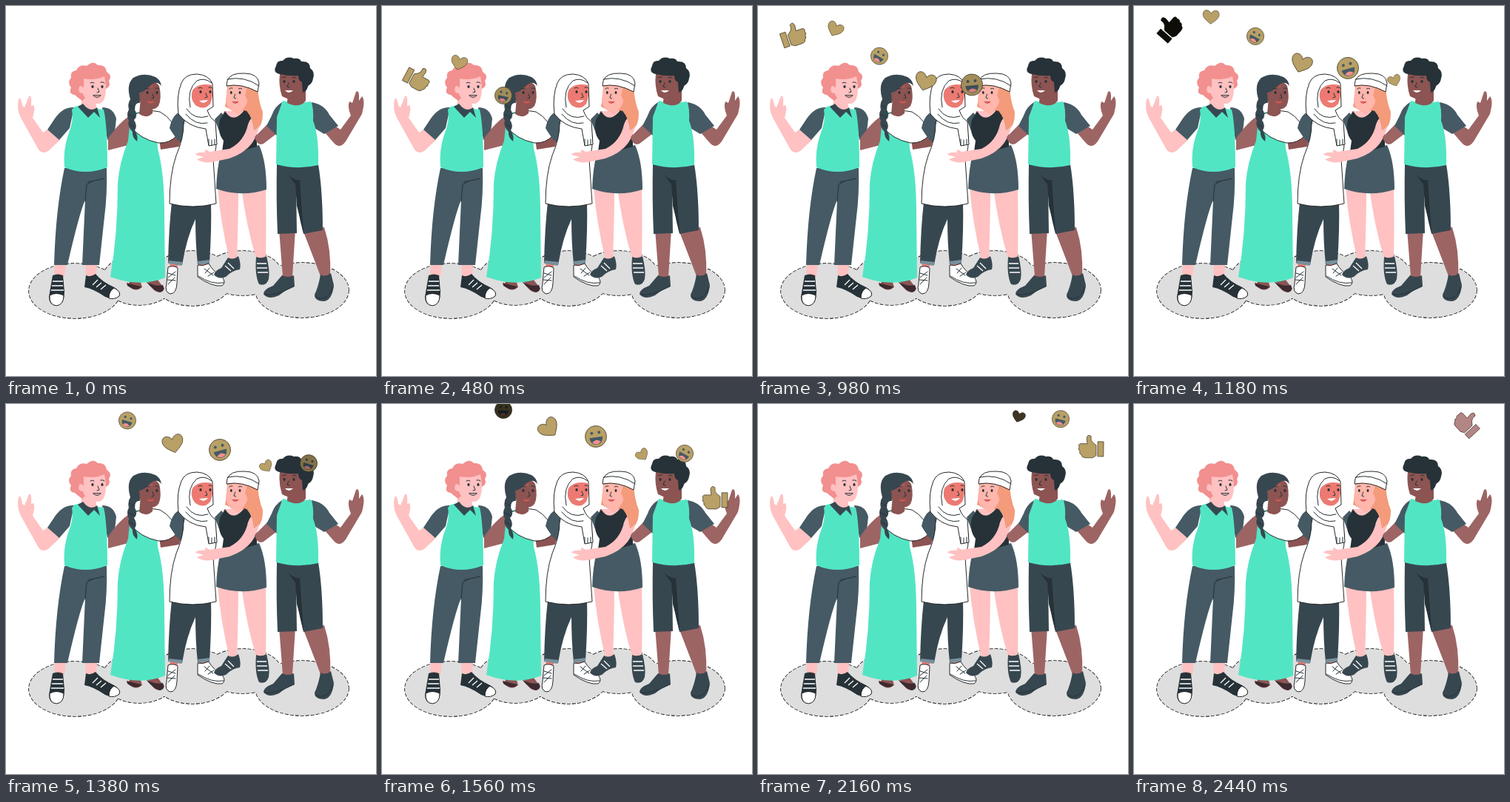
These frames come from a looping animation (500x500 px, 2.46 s). An HTML page:

```html
<!DOCTYPE html>
<html>
<head>
<meta charset="utf-8">
<style>
  html, body { margin: 0; width: 100%; height: 100%; overflow: hidden; background: #fff; }
  svg { display: block; width: 500px; height: 500px; }
  .pink { fill: #ffc1c1 } .brown { fill: #9d6464 } .deep { fill: #8c5452 } .coral { fill: #ec7a72 }
  .mint { fill: #52e5c4 } .slate { fill: #455a64 } .dark { fill: #37474f } .ink { fill: #263238 }
  .white { fill: #fff; stroke: #111; stroke-width: .9 }
  .line { fill: none; stroke: #263238; stroke-width: 1; stroke-linecap: round }
  .lace { fill: none; stroke: #fff; stroke-width: 1.3 }
  .gold { fill: #b8a066; stroke: #3a3020; stroke-width: .7 }
</style>
</head>
<body>
<svg viewBox="0 0 500 500">
  <defs>
    <g id="thumb">
      <path d="M-17-8H-9V12H-17Z"/>
      <path d="M-7-3L-2-7Q1-10 0-15Q5-19 6-12L5-5H14Q18-4 16 0Q18 3 15 5Q16 9 13 10Q12 14 8 14H-2L-7 11Z"/>
    </g>
    <path id="heart" d="M0 12C-8 6-14 2-14-5C-14-13-4-14 0-6C4-14 14-13 14-5C14 2 8 6 0 12Z"/>
    <g id="smile">
      <circle r="14.5"/>
      <g stroke="none">
        <circle class="slate" cx="-5" cy="-5" r="2"/><circle class="slate" cx="5" cy="-5" r="2"/>
        <path class="slate" d="M-9 1H9Q8 11 0 11Q-8 11-9 1Z"/>
        <path fill="#f28f8f" d="M-6 8Q0 2 6 8Q0 13-6 8Z"/>
      </g>
    </g>
    <g id="eyes" class="ink"><ellipse rx="1.6" ry="2"/><ellipse cx="13" rx="1.6" ry="2"/>
      <path class="line" d="M-3-5Q0-7 2-5M11-6Q14-7 16-5M7 2L9 7L6 8"/></g>
  </defs>

  <g fill="none" stroke="#111" stroke-width="1.6" stroke-dasharray="5 2">
    <g id="shadow">
      <ellipse cx="93" cy="385" rx="62" ry="37"/><ellipse cx="180" cy="370" rx="50" ry="34"/>
      <ellipse cx="252" cy="368" rx="55" ry="37"/><ellipse cx="320" cy="361" rx="52" ry="30"/>
      <ellipse cx="400" cy="384" rx="63" ry="37"/>
    </g>
  </g>
  <g fill="#dedede" stroke="none">
    <ellipse cx="93" cy="385" rx="62" ry="37"/><ellipse cx="180" cy="370" rx="50" ry="34"/>
    <ellipse cx="252" cy="368" rx="55" ry="37"/><ellipse cx="320" cy="361" rx="52" ry="30"/>
    <ellipse cx="400" cy="384" rx="63" ry="37"/>
  </g>

  <!-- man with curly red hair -->
  <g>
    <path class="pink" d="M66 347H81L79 366H65ZM107 347H123L122 367H108Z"/>
    <path class="ink" d="M63 364Q70 361 77 364L79 386Q79 404 68 405Q58 404 58 393Z"/>
    <path class="white" d="M59 391Q68 386 78 391Q78 404 68 405Q58 404 59 391Z"/>
    <path class="lace" d="M63 372H77M62 378H77M61 384H78"/>
    <path class="ink" d="M108 364Q114 367 121 362Q130 373 146 380Q156 386 153 392Q145 398 134 393Q118 382 106 380Z"/>
    <path class="white" d="M139 395Q139 385 146 381Q156 386 153 392Q147 397 139 395Z"/>
    <path class="lace" d="M117 377L124 370M122 380L129 374M128 383L135 377"/>
    <path class="slate" d="M79 219H136Q137 255 133 285L126 350H103L107 262Q99 280 83 350H65Q67 275 79 219Z"/>
    <path class="line" d="M107 264L109 241L118 236M111 238L133 233"/>
    <path class="pink" d="M17 126Q20 121 22 135L25 137L31 122Q35 119 34 135L37 134Q40 138 36 151L50 171L58 166L73 181L57 196Q49 201 44 194L20 151Q14 139 17 126Z"/>
    <path class="slate" d="M92 137Q77 136 66 152L56 167L72 181L86 165ZM130 137Q145 137 149 152L147 171L137 181Z"/>
    <path class="mint" d="M93 136L106 133L125 139L132 140Q137 160 137 218Q107 230 79 218Q77 195 84 174Q92 155 89 140Z"/>
    <path class="pink" d="M101 118H121L122 138Q119 147 102 134Z"/>
    <path class="dark" d="M97 136L104 132Q114 145 123 137L127 151L119 143L111 151Z"/>
    <path fill="#f28f8f" d="M103 128Q96 123 93 120Q84 119 88 110Q82 103 88 97Q86 88 95 87Q99 78 109 81Q118 73 124 80Q135 79 136 89Q144 94 139 101Q142 109 135 112L126 106Z"/>
    <path class="pink" d="M105 98Q120 101 133 95Q137 113 133 125Q129 136 115 130Q105 125 104 118Q96 118 99 109Q102 106 105 111Z"/>
    <use href="#eyes" x="117" y="109"/>
    <path class="line" d="M118 121Q123 126 128 121Z" fill="#fff"/>
  </g>

  <!-- woman with braid -->
  <g>
    <path class="deep" d="M168 370H181L184 380Q175 388 165 378ZM190 369L205 370L214 382Q208 391 199 383Z"/>
    <path fill="#3d2b30" d="M163 374Q173 377 183 379Q177 387 164 378ZM189 372Q202 380 212 377Q216 385 208 387Q199 385 189 372Z"/>
    <path class="brown" d="M168 148Q154 156 138 179V195L169 187Z"/>
    <path class="deep" d="M207 180L230 172L237 177L234 190L209 194Z"/>
    <path class="mint" d="M169 143L202 145L205 193Q214 225 214 280L215 367Q181 381 141 366Q151 308 151 240Q153 212 165 182Z"/>
    <path class="white" stroke-width=".5" d="M172 147Q190 139 208 143Q227 153 231 175Q221 186 206 185Q181 180 169 163Z"/>
    <path class="deep" d="M182 124H199L198 145Q190 153 180 146Z"/>
    <path class="deep" d="M180 104Q198 96 207 108Q211 125 206 135Q200 143 188 136Q178 129 178 119Z"/>
    <path class="dark" d="M210 108Q203 99 193 109Q187 116 180 117L181 131Q174 130 174 140Q179 149 173 154Q178 162 174 168Q179 176 177 183Q170 177 171 170Q163 162 166 155Q162 147 166 140Q164 132 168 126Q162 106 172 97Q186 89 202 96Q209 100 210 108Z"/>
    <path class="line" d="M167 134L174 138M166 147L174 151M168 160L174 164"/>
    <use href="#eyes" x="191" y="117"/>
    <circle cx="197" cy="109" r="1.2" fill="#d95753"/>
    <path d="M190 129Q196 134 201 129Z" fill="#d95753"/>
  </g>

  <!-- woman with headscarf -->
  <g>
    <path class="coral" d="M222 342H235L230 357H221ZM261 342H273L272 355H261Z"/>
    <path class="dark" d="M224 265H277Q278 300 275 347L259 349Q256 321 256 288Q244 313 238 350L219 347Q220 300 224 265Z"/>
    <path fill="#78909c" d="M220 344L239 346L237 351L219 348ZM259 345L275 343V348L260 350Z"/>
    <path class="white" d="M219 353Q226 350 232 354L231 375Q230 389 222 389Q214 387 217 375ZM259 350Q266 352 274 348Q280 359 292 366Q298 374 292 378Q279 380 259 366Z"/>
    <path class="line" d="M219 361L229 364M229 359L219 367M218 370L229 371M228 367L219 376M269 361L275 354M273 365L281 360M268 355L280 364M260 365Q278 377 294 374"/>
    <path class="slate" d="M236 143Q225 146 221 165Q227 176 236 185L246 160ZM282 153L291 144L297 151L288 169Z"/>
    <path class="white" stroke-width=".5" d="M242 151L278 155Q290 176 280 207L284 267Q252 275 221 267Q221 228 230 202Q240 179 240 160Z"/>
    <path class="white" d="M233 146Q230 121 237 104Q242 92 258 92Q274 93 279 105L280 136L272 141Q276 152 283 156L285 187L274 189L270 166Q247 164 233 146Z"/>
    <path class="coral" d="M252 114Q260 103 278 107Q281 121 276 132Q268 142 256 134Q248 125 252 114Z"/>
    <path class="line" d="M249 137Q244 113 258 101Q268 96 278 104M244 139Q255 155 273 149M243 146Q256 162 272 158M274 180V188M278 181V188M282 180V187"/>
    <use href="#eyes" x="263" y="116"/>
    <path d="M261 128Q267 134 273 127Z" fill="#fff"/>
  </g>

  <!-- woman with beanie -->
  <g>
    <path fill="#f39b7b" d="M299 106L340 104Q338 124 345 140Q351 158 335 172Q323 151 311 144L296 136Q299 120 299 106Z"/>
    <path class="pink" d="M286 245H314Q314 288 312 341L302 343Q290 294 286 245ZM318 246H351Q352 292 351 341H338Q325 298 318 246Z"/>
    <path class="dark" d="M300 340Q307 344 314 338Q318 349 316 356Q306 357 297 366Q287 370 281 363Q283 357 291 354ZM338 339Q345 342 352 338Q357 358 355 369Q352 379 342 376Q336 364 338 339Z"/>
    <path class="lace" d="M296 351L304 358M300 347L308 355M339 348H352M339 354H353M340 360H354"/>
    <path class="slate" d="M290 200L342 188Q352 210 352 248Q318 259 284 247Q285 220 290 200Z"/>
    <path class="pink" d="M294 142H328V168H290Z"/>
    <path class="ink" d="M296 142Q307 160 322 141L339 147V190L291 204L294 182Q285 171 289 154Z"/>
    <path class="pink" d="M340 148Q347 164 332 186Q322 199 302 206L283 210Q267 214 258 207L267 204L256 201Q258 197 269 198Q267 191 275 197L302 193Q322 183 327 160Q331 148 340 148Z"/>
    <path fill="#ffb6ac" d="M299 109Q314 105 329 111Q329 129 321 139Q314 151 308 143Q298 139 297 127Z"/>
    <path fill="#f39b7b" d="M326 110L340 108Q341 129 347 143Q346 163 335 168Q333 151 326 143Q328 127 323 121Z"/>
    <path class="white" d="M299 101Q303 90 322 91Q340 91 342 104L340 116Q318 104 298 108Z"/>
    <path class="line" d="M299 99Q322 94 342 108"/>
    <use href="#eyes" transform="translate(316 117) scale(-.9 1)"/>
    <path d="M305 129Q310 135 315 129Z" fill="#d95753"/>
  </g>

  <!-- man with black hair -->
  <g>
    <path class="brown" d="M369 302H391L387 366H374ZM400 300L430 299Q440 330 438 365H425Q414 336 400 300Z"/>
    <path class="dark" d="M373 364Q381 368 389 364L390 379Q380 382 369 391Q354 398 348 389Q348 383 361 378ZM425 363Q432 367 439 361L443 377Q441 397 430 399Q417 399 417 390Q422 380 425 363Z"/>
    <path class="line" d="M349 390Q362 393 389 379M418 393Q434 401 442 380"/>
    <path class="dark" d="M366 214H422Q428 250 428 303L402 308Q393 275 392 241L393 307L367 308Q365 260 366 214Z"/>
    <path class="ink" d="M381 228Q390 236 397 235L402 306L393 270L391 241Z"/>
    <path class="brown" d="M356 157L336 177Q339 190 348 186L365 173ZM430 170L446 163L452 167L466 148Q461 136 464 129L468 131L473 116Q478 112 477 128L481 122Q486 127 481 146L459 183Q451 194 443 185Z"/>
    <path class="slate" d="M373 130Q363 136 359 148L352 162L367 176ZM413 130Q430 133 437 147L449 162L430 173L415 164Z"/>
    <path class="mint" d="M374 128Q391 133 412 129Q416 137 415 155Q423 175 422 215Q394 222 365 214L366 150Z"/>
    <path class="deep" d="M381 115H405V128Q397 139 380 131Z"/>
    <path class="deep" d="M370 92Q386 86 401 93Q411 95 409 107Q402 121 393 124Q383 128 373 122Q368 107 370 92Z"/>
    <path class="ink" d="M370 92Q360 90 365 81Q366 73 374 74Q380 67 389 71Q397 70 399 75Q411 74 411 84Q418 89 415 98Q414 105 408 108Q407 115 401 117L400 103Q395 101 395 94Q382 95 370 92Z"/>
    <use href="#eyes" transform="translate(389 102) scale(-1 1)"/>
    <path d="M377 114Q382 120 388 114Z" fill="#fff"/>
  </g>

  <g id="icons"></g>
</svg>
<script>
  const LOOP = 2460, FADE = 115;
  // shape, x, scale, then [time, y, angle] stops along the rise
  const icons = [
    ["thumb", 48, 1, [200, 132, 20], [480, 98, 28], [780, 54, 8], [1190, 29, -50]],
    ["heart", 104, .78, [330, 92, 0], [480, 77, 15], [780, 49, 40], [1180, 15, 3], [1320, 6, -10]],
    ["smile", 164, .8, [380, 125, -5], [480, 121, 12], [780, 95, 28], [1180, 41, 28], [1596, 5, 0]],
    ["heart", 226, 1, [640, 138, -20], [780, 126, 0], [1180, 78, 20], [1560, 33, -40], [1800, 8, 0]],
    ["smile", 289, 1, [880, 118, 0], [1180, 84, -15], [1560, 44, -8], [1900, 19, 36], [2080, 12, 40]],
    ["heart", 352, .62, [1000, 113, 0], [1180, 101, -20], [1560, 69, -35], [1900, 39, 0], [2200, 14, 20]],
    ["smile", 409, .8, [1300, 86, 10], [1560, 67, 28], [1900, 38, 34], [2320, 10, 0]],
    ["thumb", 450, -1, [1400, 142, 10], [1560, 128, 0], [1900, 89, -30], [2460, 24, 50]]
  ].map(([shape, x, scale, ...stops]) => {
    const node = document.createElementNS("http://www.w3.org/2000/svg", "use");
    node.setAttribute("href", "#" + shape);
    node.setAttribute("class", "gold");
    document.getElementById("icons").append(node);
    return { node, x, scale, stops };
  });

  const slope = (stops, i, k) => {
    const a = stops[Math.max(i - 1, 0)], b = stops[Math.min(i + 1, stops.length - 1)];
    return (b[k] - a[k]) / (b[0] - a[0]);
  };

  // cubic Hermite curve through the stops
  function sample(stops, t, k) {
    let i = 0;
    while (i < stops.length - 2 && t > stops[i + 1][0]) i++;
    const a = stops[i], b = stops[i + 1], d = b[0] - a[0], u = (t - a[0]) / d, v = 1 - u;
    return a[k] * v * v * (1 + 2 * u) + b[k] * u * u * (3 - 2 * u)
      + d * u * v * (slope(stops, i, k) * v - slope(stops, i + 1, k) * u);
  }

  function draw(now) {
    const t = now % LOOP;
    for (const { node, x, scale, stops } of icons) {
      const start = stops[0][0], end = stops[stops.length - 1][0];
      const visible = t > start && t < end;
      node.style.display = visible ? "" : "none";
      if (!visible) continue;
      const light = Math.min(1, (t - start) / FADE, end < LOOP ? (end - t) / FADE : 1);
      node.style.filter = light < 1 ? `brightness(${light})` : "";
      node.style.fill = t > LOOP - FADE ? "#b38585" : "";
      node.setAttribute("transform",
        `translate(${x} ${sample(stops, t, 1)}) rotate(${sample(stops, t, 2)}) scale(${scale} ${Math.abs(scale)})`);
    }
    requestAnimationFrame(draw);
  }
  requestAnimationFrame(draw);
</script>
</body>
</html>
```
